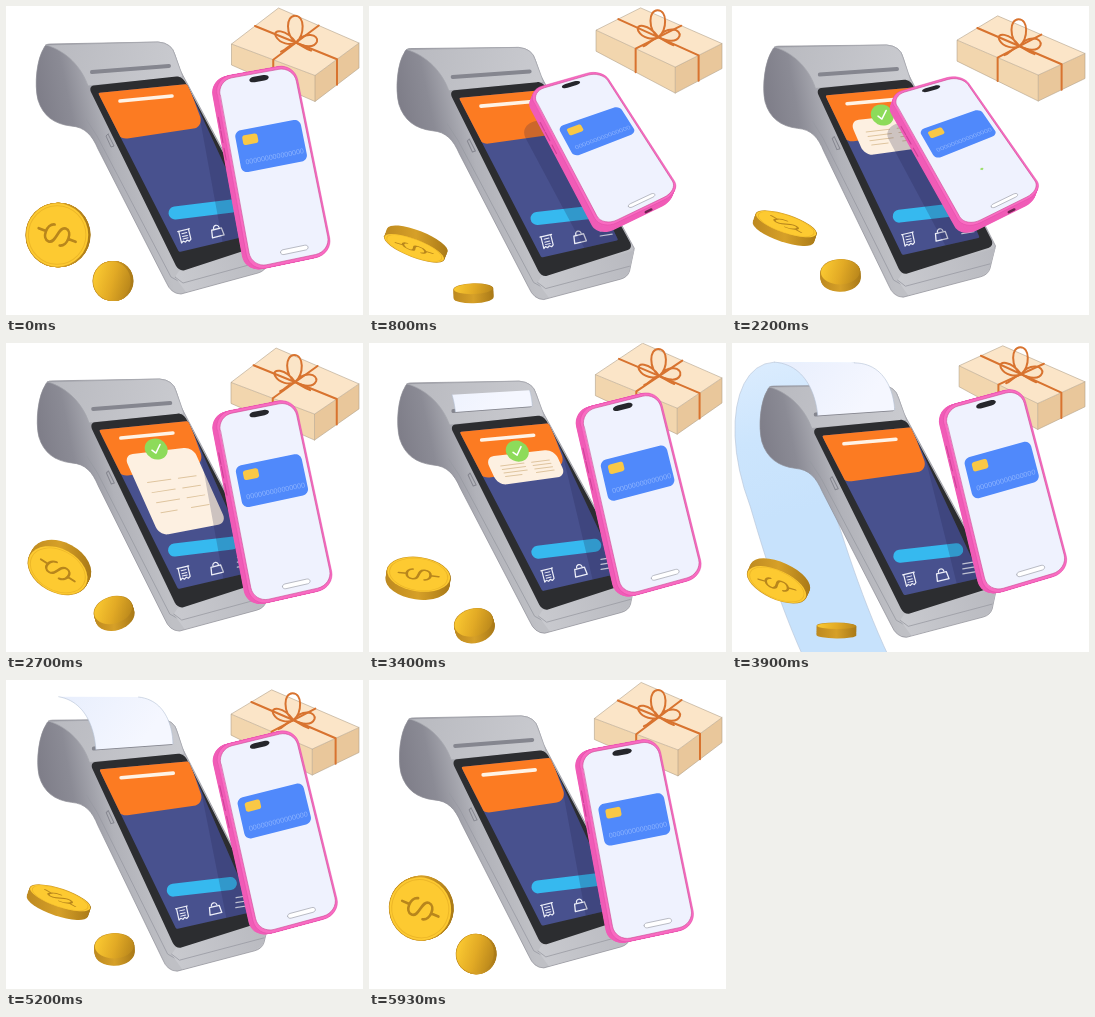
An HTML page with a canvas for the animation above (6.01 s loop, 357 by 309 pixels).

```html
<!DOCTYPE html>
<html lang="en">
<head>
<meta charset="utf-8">
<title>Contactless payment</title>
<style>
html, body { margin: 0; width: 357px; height: 309px; overflow: hidden; background: #fff; }
canvas { display: block; }
</style>
</head>
<body>
<canvas id="stage" width="357" height="309"></canvas>
<script>
const ctx = document.getElementById('stage').getContext('2d');
const LOOP = 6010, TAU = Math.PI * 2;

// ---- timing ----
const ramp01 = (t, a, b) => Math.min(1, Math.max(0, (t - a) / (b - a)));
const smooth = (t, a, b) => { const x = ramp01(t, a, b); return x * x * (3 - 2 * x); };
const pulse = (t, a, b, c, d) => smooth(t, a, b) - smooth(t, c, d);
const mix = (a, b, k) => a + (b - a) * k;

// Everything floats on a three second cycle.
function floating(time) {
  const c = Math.cos(TAU * time / 3), s = Math.sin(TAU * time / 3);
  return (base, a, b) => base + a * c + b * s;
}

// ---- drawing helpers ----
// Maps the unit square to four corners, clockwise from top left.
const quad = (a, b, c, d) => (u, v) => [0, 1].map(i => mix(mix(a[i], b[i], u), mix(d[i], c[i], u), v));

function roundRect(map, u0, v0, u1, v1, ru, rv) {
  const k = .45;
  const corner = (u, v, inU, inV, outU, outV) => {
    ctx.lineTo(...map(u + inU, v + inV));
    ctx.bezierCurveTo(...map(u + inU * k, v + inV * k), ...map(u + outU * k, v + outV * k), ...map(u + outU, v + outV));
  };
  ctx.beginPath();
  corner(u0, v0, 0, rv, ru, 0);
  corner(u1, v0, -ru, 0, 0, rv);
  corner(u1, v1, 0, -rv, -ru, 0);
  corner(u0, v1, ru, 0, 0, -rv);
  ctx.closePath();
}

function fill(color) { ctx.fillStyle = color; ctx.fill(); }

function stroke(color, width = 1) {
  ctx.strokeStyle = color;
  ctx.lineWidth = width;
  ctx.stroke();
}

function trace(pts) {
  ctx.beginPath();
  pts.forEach(p => ctx.lineTo(...p));
}

function line(color, width, ...pts) {
  trace(pts);
  stroke(color, width);
}

function poly(color, ...pts) {
  trace(pts);
  fill(color);
}

function shape(path, color, edge) {
  const p = new Path2D(path);
  ctx.fillStyle = color;
  ctx.fill(p);
  ctx.strokeStyle = edge;
  ctx.lineWidth = .7;
  ctx.stroke(p);
}

function curve(path, color, width) {
  ctx.strokeStyle = color;
  ctx.lineWidth = width;
  ctx.stroke(new Path2D(path));
}

function gradient(x0, y0, x1, y1, ...colors) {
  const g = ctx.createLinearGradient(x0, y0, x1, y1);
  colors.forEach((color, i) => g.addColorStop(i / (colors.length - 1), color));
  return g;
}

function disc(x, y, rx, ry, turn, color) {
  ctx.beginPath();
  ctx.ellipse(x, y, rx, ry, turn, 0, TAU);
  fill(color);
}

function within(draw) {
  ctx.save();
  draw();
  ctx.restore();
}

function tick(size, width) {
  line('#fff', width, [-.4 * size, .05 * size], [-.08 * size, .36 * size], [.4 * size, -.36 * size]);
}

// ---- printed paper: out of the slot, over the top, down behind ----
const EDGE = [
  [[88, 67], [86, 44], [75, 16], [45, 14]],
  [[45, 14], [5, 16], [-8, 84], [20, 159]],
  [[20, 159], [33, 205], [50, 260], [72, 309]]
];

function edgePoint(s) {
  const i = Math.min(2, Math.floor(s)), t = s - i, q = 1 - t;
  const [a, b, c, d] = EDGE[i];
  return [0, 1].map(k => a[k] * q ** 3 + 3 * b[k] * q * q * t + 3 * c[k] * q * t * t + d[k] * t ** 3);
}

function paper(from, to, color) {
  if (to <= from) return;
  const steps = Array.from({ length: 25 }, (_, i) => mix(from, to, i / 24));
  const left = steps.map(edgePoint);
  const right = steps.map((s, i) => [left[i][0] + 77 + 3 * s, left[i][1] - 6 * Math.max(0, 1 - s)]);
  poly(color, ...left, ...[...right].reverse());
  line('#b4c2d6', .6, ...left);
  line('#b4c2d6', .6, ...right);
}

function paperLength(t) {
  return t < 3.9 ? 3 * ramp01(t, 3.2, 3.9) ** 2 : 3 * (1 - ramp01(t, 3.9, 5.8));
}

// ---- terminal ----
const BEZEL = quad([82, 80], [176, 70], [265, 236], [173, 266]);
const SCREEN = quad([92, 87], [181, 78], [250, 228], [173, 246]);
const HEADER = quad([92, 87], [182, 78], [198, 121], [111, 134]);

function icons() {
  const white = '#eceef8';
  within(() => {
    ctx.translate(179, 230);
    ctx.rotate(-.24);
    line(white, 1.2, [-6, -6], [6, -6]);
    line(white, 1.2, [-5, -6], [-5, 6], [-3, 4.5], [-1, 6], [1, 4.5], [3, 6], [5, 4.5], [5, -6]);
    [-3, 0, 2.5].forEach(y => line(white, 1, [-2.5, y], [2.5, y]));
  });
  within(() => {
    ctx.translate(211, 225);
    ctx.rotate(-.24);
    line(white, 1.3, [-5, -2], [5, -2], [6, 5.5], [-6, 5.5], [-5, -2]);
    ctx.beginPath();
    ctx.arc(0, -3, 2.8, Math.PI, 0);
    stroke(white, 1.2);
  });
  [-5, 0, 5].forEach(y => line(white, 1.2, [232, 219 + y], [244, 217 + y]));
}

function receipt(grow) {
  if (grow < .01) return;
  const map = quad([117, 112], [186, 104], [mix(186, 221, grow), mix(104, 180, grow)], [mix(117, 154, grow), mix(112, 193, grow)]);
  roundRect(map, 0, 0, 1, 1, .13, Math.min(.5, .11 / grow));
  fill('#fdf0e1');
  if (grow < .35) return;
  for (let v = .36; v < .75; v += .125) {
    line('#dfc59f', 1, map(.16, v), map(v > .7 ? .4 : .5, v));
    line('#dfc59f', 1, map(.61, v), map(.87, v));
  }
}

function badge(size) {
  if (size < .01) return;
  within(() => {
    ctx.translate(149.5, 106);
    ctx.scale(size, size);
    disc(0, 0, 11.8, 10.2, .45, '#8ddb5a');
    ctx.rotate(-.15);
    if (size > .6) tick(11, 1.5);
  });
}

function terminal(t) {
  shape('M38 42C31 52 28 78 32 94C37 110 48 118 65 120C79 121 86 129 92 143L160 276Q165 288 175 288L252 267Q259 265 261 259L266 236L174 64L169 49Q166 37 152 36L44 38Q39 38 38 42Z',
    gradient(28, 90, 125, 70, '#7d7c87', '#8b8b95', '#b1b2b9', '#bfc0c5'), '#8d8d96');
  line('#989aa2', .8, [80, 113], [91, 130], [165, 271], [176, 277], [261, 255]);
  poly(gradient(170, 280, 265, 250, '#c9cacf', '#b9bac0'), [173, 265], [266, 238], [260, 261], [252, 266], [180, 286], [169, 271]);
  line('#9a9ba3', .8, [169, 271], [177, 277], [261, 254]);
  shape('M40 39L152 36Q166 37 169 49L177 71L82 80C76 62 61 45 40 39Z', gradient(45, 40, 170, 70, '#b9bac0', '#c9cacf'), '#a3a4ab');
  line('#85868f', 4, [86, 66], [163, 60]);
  line('#85868f', 1, [102, 128], [108, 140], [105, 141], [100, 130], [102, 128]);

  roundRect(BEZEL, 0, 0, 1, 1, .06, .035);
  fill('#2c2d30');
  within(() => {
    roundRect(SCREEN, 0, 0, 1, 1, .02, .01);
    fill('#48518e');
    ctx.clip();
    roundRect(HEADER, 0, -.3, 1, 1, .12, .25);
    fill('#fc7b22');
    line('#fff3e6', 3.6, [114, 95], [166, 90]);
    line('#36b9ef', 13, [169, 207], [226, 200]);
    icons();
    receipt(pulse(t, 1.95, 2.5, 2.8, 3.8));
    badge(pulse(t, 1.6, 1.92, 3.5, 3.85));
  });
}

// ---- gift ----
function gift(sway) {
  const ribbon = '#d8732f', edge = '#b3a28a';
  const L = [sway(226, -.5, 1), sway(30, 8, -5)];
  const B = [sway(269, 3.5, 3), sway(5.5, -3.5, -4)];
  const R = [353, sway(42, -5, -5)];
  const F = [sway(306.5, 2.5, 0), sway(65.5, 4, -4)];
  const down = (p, h) => [p[0], p[1] + h];
  const L2 = down(L, 21), F2 = down(F, 26), R2 = down(R, 25);
  const half = (a, b) => [(a[0] + b[0]) / 2, (a[1] + b[1]) / 2];

  poly('#f2d6ae', L, F, F2, L2);
  poly('#e9c79b', F, R, R2, F2);
  poly('#fbe5c8', L, B, R, F);
  line(edge, .6, L, B, R, R2, F2, L2, L, F, R);
  line(edge, .6, F, F2);

  const front = half(L, F), side = half(F, R);
  line(ribbon, 2, half(L2, F2), front, half(B, R));
  line(ribbon, 2, half(F2, R2), side, half(L, B));
  within(() => {
    ctx.translate(...half(half(L, R), half(B, F)));
    curve('M0 0C-11 -8 -10 -27 -1 -27C9 -27 9 -8 0 0C-10 -14 -24 -14 -20 -6C-16 1 -6 3 0 0C9 -12 23 -8 21 -1C18 6 8 4 0 0C-8 2 -9 7 -15 9M0 0C6 3 9 6 15 8', ribbon, 2);
  });
}

// ---- coins: a thick disc with the unit normal (nx, ny, nz) ----
function coin(x, y, r, nx, ny, nz, spin) {
  const thick = 9, front = nz < 0 ? -.5 : .5;
  const flat = Math.max(.03, Math.abs(nz)), turn = Math.atan(-nx / (ny || .001));
  const rim = gradient(x - r, y, x + r, y, '#bd8920', '#d6a028', '#a97917');
  for (let k = -front, i = 0; i <= 10; i++, k += front / 5) {
    disc(x + nx * thick * k, y + ny * thick * k, r, r * flat, turn, rim);
  }
  within(() => {
    ctx.translate(x + nx * thick * front, y + ny * thick * front);
    const plain = spin === undefined;
    const face = plain ? gradient(-r, -4, r, 8, '#fccb32', '#e2aa25', '#b5831a') : '#fdca31';
    disc(0, 0, r - .6, Math.max(.2, r * flat - .6), turn, face);
    if (plain) return;
    ctx.rotate(turn);
    ctx.scale(1, flat);
    ctx.beginPath();
    ctx.arc(0, 0, r - 3, 0, TAU);
    stroke('#edb728', 1);
    ctx.rotate(spin - turn);
    curve('M9 -6C7 -14 -9 -14 -9 -6C-9 2 9 -2 9 6C9 14 -7 14 -9 6M0 -12V-20M0 12V20', '#b8861c', 2.7);
  });
}

function coins(t, sway) {
  const deg = TAU / 360;
  const pitch = (120 * t + sway(0, 0, 12)) * deg;
  const yaw = .38 * Math.sin(TAU * (t - .25) / 3), rest = Math.sqrt(1 - yaw * yaw);
  coin(sway(50, 2, -3), sway(230, -1, 8), 32.3, yaw, -Math.sin(pitch) * rest, Math.cos(pitch) * rest, sway(117, -7, -24) * deg);

  // The small coin rocks and always shows its upper face.
  const rock = (120 * t + sway(-26, 26, 6)) * deg;
  const lean = sway(-.05, -.2, 0), keep = Math.sqrt(1 - lean * lean);
  coin(sway(106.5, .5, -2), sway(278, -3, 9), 20, lean, -Math.abs(Math.sin(rock)) * keep, Math.abs(Math.cos(rock)) * keep);
}

// ---- phone ----
// tap: tilts onto the terminal by way of a hop; hover: drifts up at rest.
function phonePose(t) {
  const tap = pulse(t, .1, 1.33, 1.9, 2.65);
  const hop = 4 * tap * (1 - tap);
  const hover = t > 2.5 ? Math.sin(Math.PI * (t - 2.5) / 3.5) : 0;
  const at = (rest, down, arc, drift) => mix(rest, down, tap) + arc * hop + drift * hover;
  const cx = at(266.7, 225, -8, 6), cy = at(160.8, 176, -32, -14);
  const ux = at(82, 74.5, 0, 1), uy = at(-16, -31.5, -5, -8);
  const vx = at(37, 102.5, 0, 11), vy = at(192, 91.5, 0, -5);
  const wx = at(3, 7, 0, 0), wy = at(-3, -27, 0, 0);
  const corner = (i, j) => [cx + i * ux + j * vx + i * j * wx, cy + i * uy + j * vy + i * j * wy];
  return {
    tap,
    map: quad(corner(-.5, -.5), corner(.5, -.5), corner(.5, .5), corner(-.5, .5)),
    depth: [at(-4.5, -2, 0, 0), at(1, 11, 0, 0)]
  };
}

const shifted = (map, dx, dy) => (u, v) => { const p = map(u, v); return [p[0] + dx, p[1] + dy]; };

function body(map) { roundRect(map, 0, 0, 1, 1, .2, .085); }

function phoneShade({ map, tap }) {
  within(() => {
    roundRect(SCREEN, 0, 0, 1, 1, .02, .01);
    ctx.clip();
    body(shifted(map, mix(-16, 0, tap), 30));
    fill('rgba(35,35,75,.22)');
  });
}

// Draws in flat phone units around one point of the face.
function onFace(map, u, v, draw) {
  const o = map(u, v), a = map(u + .1, v), b = map(u, v + .1);
  within(() => {
    ctx.transform((a[0] - o[0]) / 8.2, (a[1] - o[1]) / 8.2, (b[0] - o[0]) / 19.4, (b[1] - o[1]) / 19.4, ...o);
    draw();
  });
}

function phone(t, { map, depth: [dx, dy] }) {
  for (let k = 1; k > -.01; k -= .1) {
    body(shifted(map, dx * k, dy * k));
    fill(k > .05 ? '#f05cb7' : '#f96bc2');
  }
  stroke('#de4ba5', .5);
  const side = shifted(map, dx * .6, dy * .6);
  [.2, .27, .36].forEach(v => line('#cf4299', 1.1, side(0, v), side(0, v + .06)));
  if (dy > 3) line('#6d2350', 2.4, side(.58, 1), side(.65, 1));

  roundRect(map, .035, .015, .98, .984, .18, .076);
  fill('#eff2fe');
  stroke('#c8478f', .6);
  roundRect(map, .42, .03, .66, .058, .06, .014);
  fill('#25262b');
  roundRect(map, .4, .926, .73, .951, .035, .0125);
  fill('#fff');
  stroke('#a9abb5', .8);

  roundRect(map, .125, .285, .93, .502, .075, .032);
  fill('#5089fb');
  roundRect(map, .205, .315, .39, .365, .03, .012);
  fill('#f9c846');
  onFace(map, .19, .462, () => {
    ctx.font = '7px "Liberation Sans", Arial, sans-serif';
    ctx.fillStyle = '#8fb5ff';
    ctx.fillText('000000000000000', 0, 0);
  });

  const paid = pulse(t, 1.3, 1.6, 2, 2.25);
  if (paid > .01) onFace(map, .54, .68, () => {
    ctx.scale(paid, paid);
    disc(0, 0, 16.5, 16.5, 0, '#fff');
    stroke('#a3a8b0', .8);
    disc(0, 0, 14, 14, 0, '#8ddb5a');
    tick(14, 1.8);
  });
}

function draw(t) {
  ctx.setTransform(1, 0, 0, 1, 0, 0);
  ctx.lineCap = ctx.lineJoin = 'round';
  ctx.fillStyle = '#fff';
  ctx.fillRect(0, 0, 357, 309);

  const sway = floating(t), pose = phonePose(t), length = paperLength(t);
  const lean = sway(-1.4, 1.4, 3.4) / 193, tip = sway(1, -1, 0) / 142;

  within(() => {
    ctx.transform(1, tip, lean, 1, sway(0, 0, -2.6) - 37 * lean, sway(3, -3, 1.2) - 38 * tip);
    paper(1, length, gradient(0, 20, 40, 170, '#dbecfe', '#cce5fd', '#c7e2fc'));
    terminal(t);
    phoneShade(pose);
    paper(0, Math.min(1, length), gradient(60, 15, 130, 65, '#e9effd', '#f5f7ff'));
  });
  gift(sway);
  phone(t, pose);
  coins(t, sway);
}

// The picture steps twice every 100 ms, at 0 and at 30.
function steppedTime(now) {
  const ms = now % LOOP;
  return Math.min(119, Math.floor(ms / 100) * 2 + (ms % 100 >= 30 ? 1 : 0)) * .05;
}

const start = performance.now();
function loop() {
  draw(steppedTime(performance.now() - start));
  requestAnimationFrame(loop);
}
loop();
</script>
</body>
</html>
```
